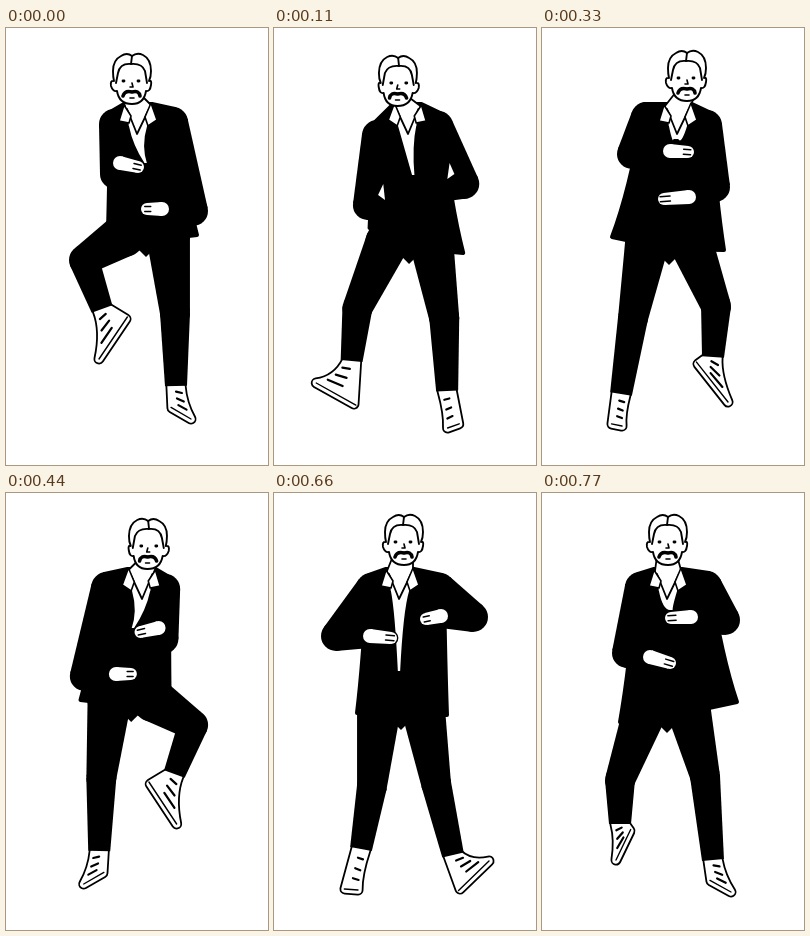
These frames come from a looping animation (262 px wide and 437 px high, 0.88 s). An HTML page with a canvas:

```html
<!DOCTYPE html>
<html lang="en">
<head>
<meta charset="utf-8">
<title>Dancing man</title>
<style>
  html, body { margin: 0; width: 100%; height: 100%; overflow: hidden; background: #fff; }
  canvas { display: block; width: 262px; height: 437px; }
</style>
</head>
<body>
<canvas id="stage"></canvas>
<script>
const W = 262, H = 437, STEP = 110;
const INK = '#000', PAPER = '#fff';
const ARM = [15, 15, 12], HAND = [7, 6], LEG = [22, 15, 11];
const NECK_Y = 106, HIP = 22;

const canvas = document.getElementById('stage');
const ctx = canvas.getContext('2d');
const ratio = window.devicePixelRatio || 1;
canvas.width = W * ratio;
canvas.height = H * ratio;

// Arms: shoulder, elbow, wrist, knuckles (none when pocketed).
// Legs: knee, ankle, heel, toe.
const kneeUp = {
  head: [125, 25], neck: 131, tip: [140, 136], pelvis: [140, 207],
  hem: [[102, 202], [191, 207]],
  arms: [[[108, 96], [109, 146], [114, 135], [132, 139]], [[167, 94], [187, 183], [156, 181], [141, 181]]],
  legs: [[[78, 232], [96, 281], [120, 291], [93, 331]], [[169, 285], [170, 358], [166, 380], [185, 391]]]
};
const heelOut = {
  head: [143, 27], neck: 133, tip: [127, 148], pelvis: [130, 214],
  hem: [[76, 225], [170, 200]],
  arms: [[[103, 98], [76, 156], [92, 161]], [[164, 107], [172, 177], [160, 178]]],
  legs: [[[94, 290], [90, 363], [78, 396], [89, 400]], [[181, 280], [186, 333], [183, 376], [221, 355]]]
};
const wideA = {
  head: [145, 18], neck: 143, tip: [138, 193], pelvis: [127, 215],
  hem: [[81, 214], [191, 221]],
  arms: [[[108, 92], [74, 116], [113, 110], [126, 114]], [[180, 96], [206, 137], [180, 147], [158, 148]]],
  legs: [[[92, 288], [74, 368], [78, 404], [56, 383]], [[158, 293], [165, 359], [162, 378], [188, 393]]]
};
const crossA = {
  head: [144, 22], neck: 135, tip: [134, 112], pelvis: [127, 215],
  hem: [[70, 209], [182, 222]],
  arms: [[[104, 89], [90, 126], [128, 123], [146, 124]], [[165, 97], [173, 159], [147, 169], [122, 171]]],
  legs: [[[91, 290], [79, 366], [70, 396], [80, 398]], [[174, 278], [171, 329], [156, 336], [186, 374]]]
};
const wideB = {
  head: [129, 21], neck: 125, tip: [125, 179], pelvis: [127, 215],
  hem: [[83, 220], [173, 222]],
  arms: [[[97, 95], [62, 143], [96, 143], [117, 145]], [[166, 95], [199, 124], [167, 123], [152, 126]]],
  legs: [[[98, 293], [87, 356], [71, 396], [84, 397]], [[162, 290], [179, 362], [186, 396], [215, 368]]]
};
const crossB = {
  head: [125, 21], neck: 125, tip: [130, 118], pelvis: [125, 218],
  hem: [[78, 229], [195, 209]],
  arms: [[[98, 94], [85, 160], [108, 164], [128, 170]], [[165, 93], [183, 127], [149, 124], [129, 125]]],
  legs: [[[78, 287], [78, 331], [88, 338], [74, 367]], [[163, 283], [171, 367], [169, 388], [189, 399]]]
};

const flip = pose => ({ ...pose, mirrored: true });
const dance = [kneeUp, flip(heelOut), wideA, crossA, flip(kneeUp), heelOut, wideB, crossB];

const mix = (a, b, t) => a.map((v, i) => v + (b[i] - v) * t);

// Offset of the given length, square to the line from a to b.
function square(a, b, length) {
  const dx = b[0] - a[0], dy = b[1] - a[1], k = length / Math.hypot(dx, dy);
  return [-dy * k, dx * k];
}

function trace(pts) {
  ctx.beginPath();
  pts.forEach(p => ctx.lineTo(...p));
}

function polygon(pts, fill = INK, line = 0) {
  trace(pts);
  ctx.closePath();
  ctx.fillStyle = fill;
  ctx.fill();
  ctx.lineWidth = line;
  if (line) ctx.stroke();
}

function line(a, b, width) {
  trace([a, b]);
  ctx.lineWidth = width;
  ctx.stroke();
}

// Tapered limb with round joints; a flat end makes a cuff.
function limb(joints, radii, color = INK, flat = false) {
  ctx.fillStyle = color;
  joints.forEach((p, i) => {
    const last = i === joints.length - 1;
    if (!(last && flat)) {
      ctx.beginPath();
      ctx.arc(...p, radii[i], 0, 2 * Math.PI);
      ctx.fill();
    }
    if (last) return;
    const q = joints[i + 1];
    const [ax, ay] = square(p, q, radii[i]), [bx, by] = square(p, q, radii[i + 1]);
    polygon([[p[0] + ax, p[1] + ay], [q[0] + bx, q[1] + by], [q[0] - bx, q[1] - by], [p[0] - ax, p[1] - ay]], color);
  });
}

function drawShoe([knee, ankle, heel, toe]) {
  const [sx, sy] = square(knee, ankle, 5);
  const left = [ankle[0] + sx, ankle[1] + sy], right = [ankle[0] - sx, ankle[1] - sy];
  const [back, front] = toe[0] > heel[0] ? [left, right] : [right, left];
  const bend = mix(mix(front, toe, 0.5), heel, 0.25);
  const outline = new Path2D();
  outline.moveTo(...back);
  outline.lineTo(...front);
  outline.quadraticCurveTo(...bend, ...toe);
  outline.lineTo(...heel);
  outline.closePath();
  for (const [color, width] of [[INK, 11], [PAPER, 7.4]]) {
    ctx.strokeStyle = ctx.fillStyle = color;
    ctx.lineWidth = width;
    ctx.stroke(outline);
    ctx.fill(outline);
  }
  ctx.strokeStyle = INK;
  line(mix(heel, toe, -0.05), toe, 1.4);
  for (const t of [0.2, 0.45, 0.7]) {
    const eyelet = mix(mix(front, bend, t), mix(bend, toe, t), t);
    line(eyelet, mix(eyelet, mix(back, heel, t), 0.55), 2.2);
  }
}

function drawCoat({ neck, hem, arms, pelvis }) {
  const sides = arms.map(([s], i) => [s[0] + (i ? 4 : -4), s[1]]);
  const waists = sides.map((s, i) => [mix(s, hem[i], 0.4)[0], mix(s, hem[i], 0.6)[1]]);
  ctx.beginPath();
  ctx.moveTo(neck - 13, NECK_Y - 30);
  ctx.lineTo(arms[0][0][0] - 2, arms[0][0][1] - 13);
  ctx.lineTo(...sides[0]);
  ctx.quadraticCurveTo(...waists[0], ...hem[0]);
  ctx.lineTo(pelvis[0], pelvis[1] + 6);
  ctx.lineTo(...hem[1]);
  ctx.quadraticCurveTo(...waists[1], ...sides[1]);
  ctx.lineTo(arms[1][0][0] + 2, arms[1][0][1] - 13);
  ctx.lineTo(neck + 15, NECK_Y - 30);
  ctx.closePath();
  ctx.lineWidth = 4;
  ctx.fillStyle = INK;
  ctx.fill();
  ctx.stroke();
}

function drawShirt({ head, neck, tip }) {
  const at = (x, y) => [neck + x, NECK_Y + y];
  ctx.beginPath();
  ctx.moveTo(head[0] - 10, head[1] + 42);
  ctx.lineTo(...at(-12, -28));
  ctx.lineTo(...at(-9, -8));
  ctx.quadraticCurveTo(...at(-5, 12), tip[0] - 2, tip[1]);
  ctx.lineTo(tip[0] + 2, tip[1]);
  ctx.quadraticCurveTo(...at(5, 12), ...at(11, -8));
  ctx.lineTo(...at(14, -29));
  ctx.lineTo(head[0] + 10, head[1] + 42);
  ctx.fillStyle = PAPER;
  ctx.fill();
  ctx.lineWidth = 1.8;
  ctx.stroke();
  trace([at(-10, -25), at(0, 0), at(12, -25)]);
  ctx.stroke();
  polygon([at(-13, -29), at(-18, -13), at(-8, -11), at(-6, -18)], PAPER, 1.6);
  polygon([at(14, -31), at(20, -14), at(11, -8), at(8, -17)], PAPER, 1.6);
}

function drawHand([, , wrist, knuckles]) {
  limb([wrist, knuckles], HAND.map(r => r + 1.4));
  limb([wrist, knuckles], HAND, PAPER);
  const [nx, ny] = square(wrist, knuckles, 2.5);
  for (const side of [-1, 1]) {
    const end = mix(wrist, knuckles, 1.15), start = mix(wrist, knuckles, 0.75);
    line([start[0] + nx * side, start[1] + ny * side], [end[0] + nx * side, end[1] + ny * side], 1.5);
  }
}

// Daylight between a pocketed arm and the coat.
function drawGap([, [x, y]], i) {
  const side = i ? -1 : 1;
  polygon([[x + side * 15, y - 21], [x + side * 10, y - 10], [x + side * 17, y - 5]], PAPER);
}

const skull = new Path2D('M1 3Q-4-1-10 3Q-18 7-18 18Q-18 24-17 28Q-21 27-20 33Q-18 39-14 38Q-12 51 1 51Q13 51 15 38Q19 39 20 32Q21 27 18 28Q20 24 20 18Q20 6 12 2Q6-1 1 3Z');
const hairline = new Path2D('M1 3L0 11Q-11 10-13 20L-15 30M0 11Q11 10 14 18L16 30');
const nose = new Path2D('M1 30L2 34L-1 34M-1 45H3');
const eyes = new Path2D('M-8 28H-7M7 28H8');
const moustache = new Path2D('M-8 43Q-6 37 1 39Q8 37 9 43');

function drawHead([x, y]) {
  ctx.save();
  ctx.translate(x, y);
  ctx.fillStyle = PAPER;
  ctx.fill(skull);
  for (const [path, width] of [[skull, 1.9], [hairline, 1.9], [nose, 1.6], [eyes, 2.8], [moustache, 3.6]]) {
    ctx.lineWidth = width;
    ctx.stroke(path);
  }
  ctx.restore();
}

function drawPose(pose) {
  const { pelvis: [px, py], arms, legs } = pose;
  const hips = [[px - HIP, py], [px + HIP, py]];
  ctx.setTransform(ratio, 0, 0, ratio, 0, 0);
  ctx.fillStyle = PAPER;
  ctx.fillRect(0, 0, W, H);
  ctx.strokeStyle = INK;
  ctx.lineCap = ctx.lineJoin = 'round';
  // The slight shear keeps the supporting foot planted.
  if (pose.mirrored) ctx.transform(-1, 0, -0.015, 1, 268.6, 0);

  legs.forEach(drawShoe);
  legs.forEach(([knee, ankle], i) => limb([hips[i], knee, ankle], LEG, INK, true));
  polygon([...hips, [px, py + 22]]);
  drawCoat(pose);
  arms.forEach(arm => limb(arm.slice(0, 3), ARM));
  drawShirt(pose);
  arms.forEach((arm, i) => arm[3] ? drawHand(arm) : drawGap(arm, i));
  drawHead(pose.head);
}

const start = performance.now();
let shown = -1;

function tick() {
  const beat = Math.floor((performance.now() - start) / STEP) % dance.length;
  if (beat !== shown) drawPose(dance[shown = beat]);
  requestAnimationFrame(tick);
}
tick();
</script>
</body>
</html>
```
